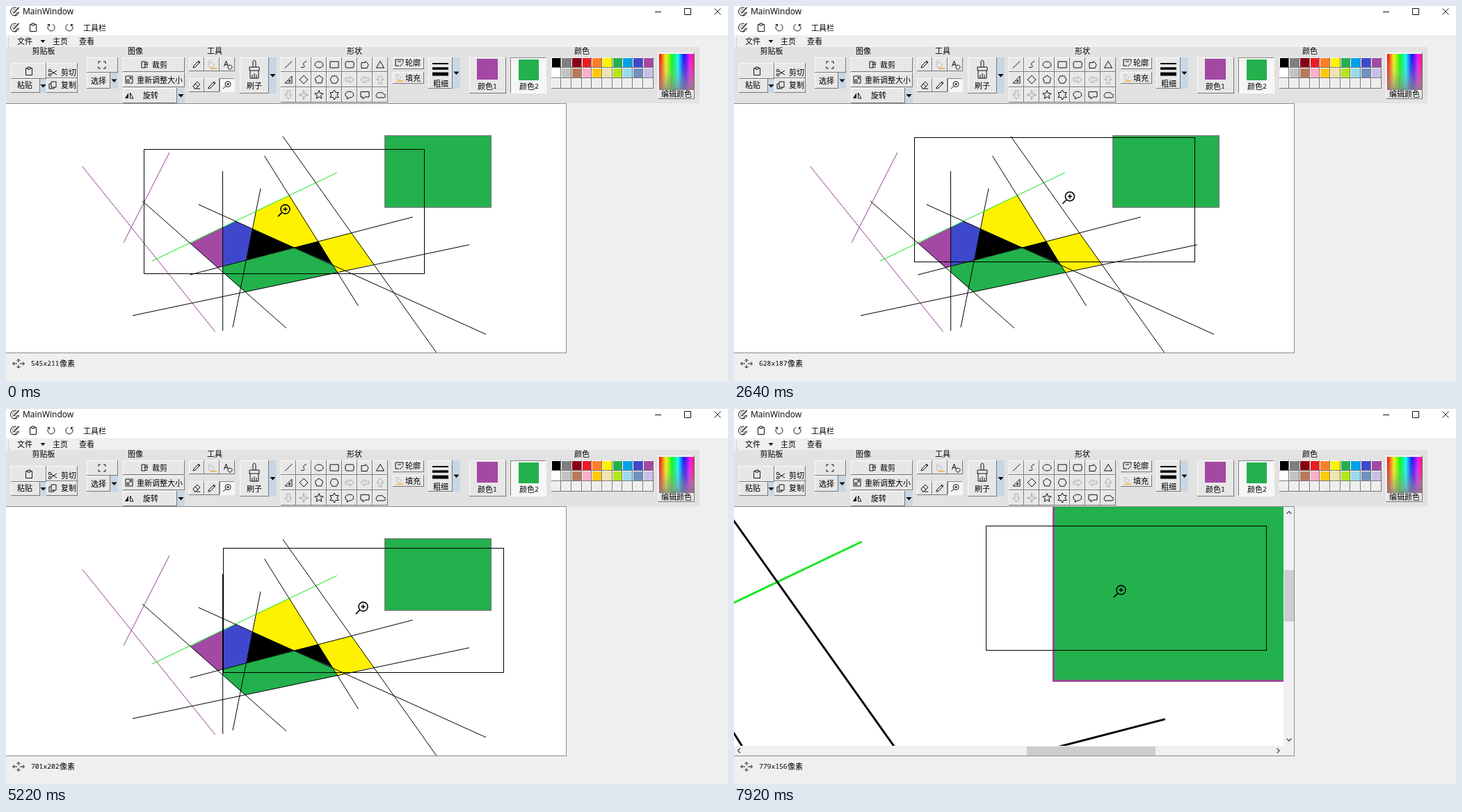
These frames come from a looping animation (1038 by 540 pixels, 7990 ms). An HTML page with a canvas:

```html
<!DOCTYPE html>
<html lang="zh-CN">
<head>
<meta charset="utf-8">
<title>MainWindow</title>
<style>
html, body { margin: 0; width: 100%; height: 100%; overflow: hidden; background: #efefef; }
canvas { display: block; }
</style>
</head>
<body>
<canvas id="stage" width="1038" height="540"></canvas>
<script>
const W = 1038, H = 540, LOOP = 7990, STEP = 69.4;
const TOP = 141, VIEW_W = 806, VIEW_H = 359, UNIT = 1.3625;
const CJK = '"Noto Sans CJK SC", "Noto Sans CJK", sans-serif';
const DIGITS = '9.7px "Noto Sans Mono", monospace';
const PURPLE = '#a349a4', GREEN = '#22b14c', YELLOW = '#fff200', BLUE = '#3f48cc';
const ctx = document.getElementById('stage').getContext('2d');

// ---------- helpers ----------
function box(g, x0, y0, x1, y1, fill) {
  g.fillStyle = fill;
  g.fillRect(x0, y0, x1 - x0, y1 - y0);
}

function line(g, x0, y0, x1, y1, color, width = 1) {
  g.strokeStyle = color;
  g.lineWidth = width;
  g.beginPath();
  g.moveTo(x0, y0);
  g.lineTo(x1, y1);
  g.stroke();
}

function label(g, s, x, y, font = '11px ' + CJK, align = 'left') {
  g.font = font;
  g.textAlign = align;
  g.textBaseline = 'middle';
  g.fillStyle = '#000';
  g.fillText(s, x, y);
}

function icon(g, d, x, y, { color = '#111', width = 1, fill = false, scale = 1 } = {}) {
  g.save();
  g.translate(x, y);
  g.scale(scale, scale);
  g.lineWidth = width;
  g.strokeStyle = g.fillStyle = color;
  const path = new Path2D(d);
  if (fill) g.fill(path); else g.stroke(path);
  g.restore();
}

function ring(n, r0, r1 = r0, turn = -90) {
  const pts = [];
  for (let i = 0; i < n; i++) {
    const a = (turn + 360 * i / n) * Math.PI / 180, r = i % 2 ? r1 : r0;
    pts.push((r * Math.cos(a)).toFixed(2) + ' ' + (r * Math.sin(a)).toFixed(2));
  }
  return 'M' + pts.join('L') + 'Z';
}

function button(g, x0, y0, x1, y1, down = false) {
  box(g, x0, y0, x1, y1, down ? '#f6f6f6' : '#e7e7e7');
  const lit = down ? '#858585' : '#fafafa', dark = down ? '#fafafa' : '#777';
  box(g, x0, y0, x1, y0 + 1, lit);
  box(g, x0, y0, x0 + 1, y1, lit);
  box(g, x0, y1 - 1, x1, y1, dark);
  box(g, x1 - 1, y0, x1, y1, dark);
}

function drop(g, x0, y0, x1, y1) {
  box(g, x0, y0, x1, y1, '#c9d7e4');
  icon(g, 'M-4 -2H4L0 2.5Z', (x0 + x1) / 2, (y0 + y1) / 2, { fill: true, color: '#000' });
}

// ---------- window and ribbon ----------
const ICON = {
  palette: 'M2 -5.5A6 6 0 1 0 5.5 1Q5 2 3 2Q1 2 1.5 4Q1.5 6 -1 6M6 -6L0 1L-1.5 2L-1 0L5 -6M-4 -1h1.5M-2 -3.5h1.5M-3.5 2h1.5',
  clip: 'M-2 -4.5H-4.5V5.5H4.5V-4.5H2M-2 -6H2V-3H-2Z',
  undo: 'M-3 -4A5 5 0 1 0 2 -4.6M-5.5 -4.5H-2.5V-1.5',
  redo: 'M3 -4A5 5 0 1 1 -2 -4.6M5.5 -4.5H2.5V-1.5',
  cut: 'M-2 2L6 -3M-2 -2L6 3M-2 -3A2 1.7 0 1 0 -6 -3A2 1.7 0 1 0 -2 -3M-2 3A2 1.7 0 1 0 -6 3A2 1.7 0 1 0 -2 3',
  copy: 'M-2 -5H5V3H-2ZM-2 -2H-5V5H2V3',
  frame: 'M-5 -2V-5H-2M2 -5H5V-2M5 2V5H2M-2 5H-5V2',
  crop: 'M-4 -4H1V5H-4ZM1 -3H5M1 4H5M-1 0H5M3 -2L5 0L3 2',
  resize: 'M-5 -5H5V5H-5ZM-3 3H0V0H-3ZM1 -1L3 -3M0 -3H3V0',
  flip: 'M-1 -4V4H-6Z',
  flipSide: 'M1.5 -4V4H6Z',
  pencil: 'M-5 5L-4 2L3 -5L5 -3L-2 4ZM2 -4L4 -2',
  bucket: 'M-4 -5L4 1L1 5L-4 4Z',
  eraser: 'M-5 1L1 -5L5 -1L-1 5H-3ZM-2 -2L2 2M-1 5H5',
  brush: 'M-2 -4V-12Q0 -16 2 -12V-4M-7 -4H7V1H-7ZM-6 1V12H6V1M-3 12V7M0 12V5M3 12V7',
  lens: 'M5 -1.5A4 4 0 1 0 -3 -1.5A4 4 0 1 0 5 -1.5M-2 1.5L-6 5M-1 -1.5H3M1 -3.5V.5',
  move: 'M-8 0H-2M2 0H8M0 -6V-2M0 2V6M-6 -2.5L-8.5 0L-6 2.5M6 -2.5L8.5 0L6 2.5M-2.5 -4L0 -6.5L2.5 -4M-2.5 4L0 6.5L2.5 4'
};

const SHAPES = [
  'M-5 5L5 -5', 'M-4 4C8 4 -7 -1 4 -5', 'M6 0A6 4.5 0 1 0 -6 0A6 4.5 0 1 0 6 0', 'M-6 -4.5H6V4.5H-6Z',
  'M-4 -4.5H4Q6 -4.5 6 -2.5V2.5Q6 4.5 4 4.5H-4Q-6 4.5 -6 2.5V-2.5Q-6 -4.5 -4 -4.5Z',
  'M-5 -3L0 -3L1 -5L5 0L3 5H-5Z', 'M0 -5L5.5 4.5H-5.5Z',
  'M-5 5L5 -5V5ZM0 2.5H2.5V0Z', ring(4, 6), ring(5, 6), ring(6, 6, 6, 0), 'M-6 -2H0V-5L6 0L0 5V2H-6Z',
  'M6 -2H0V-5L-6 0L0 5V2H6Z', 'M-2 6V0H-5L0 -6L5 0H2V6Z',
  'M-2 -6V0H-5L0 6L5 0H2V-6Z', ring(8, 7, 2), ring(10, 6.5, 2.8), ring(12, 7, 4),
  'M-3 3.5A6 4.5 0 1 1 0 4L-4 6Z', 'M-6 -4.5H6V3H0L-3 6V3H-6Z',
  'M-4 4A3 3 0 0 1 -5 -1A3.5 3.5 0 0 1 0 -3A3.5 3.5 0 0 1 5 -1A2.5 2.5 0 0 1 5 4Z'
];
const GREY_SHAPES = [11, 12, 13, 14, 15];

const SWATCHES = ['000 7f7f7f 880015 ed1c24 ff7f27 fff200 22b14c 00a2e8 3f48cc a349a4',
  'fff c3c3c3 b97a57 ffaec9 ffc90e efe4b0 b5e61d 99d9ea 7092be c8bfe7',
  'eee eee eee eee eee eee eee eee eee eee'].map(r => r.split(' '));

function drawRainbow(g, x, y, w, h) {
  let seed = 7;
  const rnd = () => (seed = seed * 16807 % 2147483647) / 2147483647;
  for (let i = 0; i < w; i += 2) {
    const hue = 345 * i / w;
    const fade = g.createLinearGradient(0, y, 0, y + h);
    fade.addColorStop(0, `hsl(${hue},95%,52%)`);
    fade.addColorStop(0.3 + 0.25 * rnd(), `hsl(${hue},80%,56%)`);
    fade.addColorStop(0.7 + 0.25 * rnd(), `hsl(${hue},38%,56%)`);
    fade.addColorStop(1, `hsl(${hue},14%,52%)`);
    g.fillStyle = fade;
    g.fillRect(x + i, y, 2, h);
  }
}

function drawWindow(g) {
  box(g, 0, 0, W, H, '#efefef');
  box(g, 0, 0, W, 42, '#fff');
  icon(g, ICON.palette, 13, 8);
  label(g, 'MainWindow', 24, 9, '12px "Open Sans", sans-serif');
  line(g, 933, 8.5, 942, 8.5, '#111');
  icon(g, 'M-4.5 -4.5H4.5V4.5H-4.5Z', 980, 8);
  icon(g, 'M-4.5 -4.5L4.5 4.5M4.5 -4.5L-4.5 4.5', 1023, 8);

  ['palette', 'clip', 'undo', 'redo'].forEach((n, i) => icon(g, ICON[n], 13 + 26 * i, 31));
  label(g, '工具栏', 111, 32);
  for (let y = 45; y < 58; y += 3) box(g, 3, y, 4, y + 1, '#999');
  label(g, '文件', 16, 51);
  icon(g, 'M-3.5 -2H3.5L0 2Z', 53, 51, { fill: true });
  label(g, '主页', 67, 51);
  label(g, '查看', 105, 51);

  box(g, 0, 59, 997, 140, '#e2e2e2');
  [['剪贴板', 54], ['图像', 186], ['工具', 300], ['形状', 501], ['颜色', 828]]
    .forEach(([s, x]) => label(g, s, x, 65, undefined, 'center'));

  // clipboard
  button(g, 7, 82, 58, 105);
  button(g, 7, 105, 49, 125);
  drop(g, 49, 105, 58, 125);
  icon(g, ICON.clip, 33, 94);
  label(g, '粘贴', 16, 114);
  button(g, 58, 82, 103, 104);
  button(g, 58, 104, 103, 125);
  icon(g, ICON.cut, 67, 96);
  icon(g, ICON.copy, 67, 114);
  label(g, '剪切', 79, 96);
  label(g, '复制', 79, 114);

  // image
  button(g, 116, 74, 161, 96);
  button(g, 116, 96, 150, 119);
  drop(g, 150, 96, 161, 119);
  icon(g, ICON.frame, 138, 85);
  label(g, '选择', 122, 108);
  button(g, 168, 74, 257, 95);
  button(g, 168, 96, 257, 117);
  button(g, 168, 118, 246, 140);
  drop(g, 246, 118, 257, 140);
  icon(g, ICON.crop, 199, 84);
  icon(g, ICON.resize, 177, 106);
  icon(g, ICON.flip, 177, 129, { fill: true });
  icon(g, ICON.flipSide, 177, 129);
  label(g, '裁剪', 210, 85);
  label(g, '重新调整大小', 188, 107);
  label(g, '旋转', 197, 129);

  // tools
  for (let i = 0; i < 6; i++) {
    const x = 263 + 22 * (i % 3), y = i < 3 ? 74 : 104;
    button(g, x, y, x + 22, y + 20, i === 5);
  }
  icon(g, ICON.pencil, 274, 84);
  icon(g, ICON.bucket, 296, 84, { color: '#bbb' });
  line(g, 294, 90, 303, 90, '#f2bd58', 2);
  label(g, 'A', 313, 84, '11px "Open Sans", sans-serif');
  icon(g, ring(12, 3), 322, 88);
  icon(g, ICON.eraser, 274, 114);
  icon(g, ICON.pencil, 296, 114);
  icon(g, ICON.lens, 318, 114);
  button(g, 336, 74, 378, 126);
  drop(g, 378, 74, 389, 126);
  icon(g, ICON.brush, 357, 92);
  label(g, '刷子', 346, 115);

  // shapes
  SHAPES.forEach((d, i) => {
    const x = 395 + 22 * (i % 7), row = Math.floor(i / 7);
    const y = Math.round(73.5 + 21.8 * row), end = Math.round(73.5 + 21.8 * (row + 1));
    button(g, x, y, x + 22, end);
    icon(g, d, x + 11, (y + end) / 2, { color: GREY_SHAPES.includes(i) ? '#aaa' : '#111' });
  });
  button(g, 556, 74, 601, 91);
  button(g, 556, 95, 601, 112);
  icon(g, 'M-5 -5H6V-1M-5 -5V4H0M-2 -2H3M1 5L6 0', 565, 82);
  icon(g, ICON.bucket, 565, 102, { color: '#bbb', scale: .8 });
  line(g, 562, 108, 571, 108, '#f2bd58', 2);
  label(g, '轮廓', 574, 82);
  label(g, '填充', 574, 104);
  button(g, 607, 74, 642, 119);
  drop(g, 642, 74, 653, 119);
  [[83, 2], [90, 3.5], [98, 5]].forEach(([y, w]) => line(g, 613, y, 636, y, '#000', w));
  label(g, '粗细', 614, 112);

  // colours
  button(g, 666, 74, 719, 126);
  button(g, 725, 74, 777, 126, true);
  box(g, 677, 76, 707, 106, PURPLE);
  box(g, 737, 77, 766, 107, GREEN);
  [['1', 678], ['2', 738]].forEach(([n, x]) => {
    label(g, '颜色', x, 116);
    label(g, n, x + 22, 116, DIGITS);
  });
  SWATCHES.forEach((row, r) => row.forEach((c, i) => {
    const x0 = Math.round(783.5 + 14.7 * i), x1 = Math.round(798.2 + 14.7 * i), y = 74 + 15 * r;
    button(g, x0, y, x1, y + 15);
    box(g, x0 + 1, y + 1, x1 - 1, y + 14, '#' + c);
  }));
  button(g, 937, 67, 990, 134);
  drawRainbow(g, 939, 69, 50, 52);
  label(g, '编辑颜色', 942, 127);

  icon(g, ICON.move, 18, 515);
}

// ---------- picture ----------
const FILLS = [
  [PURPLE, 265, 341, 311, 318, 311, 374, 304, 376],
  [BLUE, 311, 318, 330, 309, 354, 320, 346, 365, 311, 374],
  [YELLOW, 360, 294, 408, 272, 449, 338, 414, 347, 354, 320],
  [YELLOW, 449, 338, 497, 326, 529, 371, 477, 383, 469, 371],
  [GREEN, 311, 374, 414, 347, 469, 371, 477, 383, 343, 411, 311, 382],
  ['#000', 354, 320, 414, 347, 346, 365],
  ['#000', 414, 347, 449, 338, 469, 371]
];
const LINES = [
  [109.6, 230, 300.6, 468, '#914293'], [235, 210, 169, 340, '#914293'],
  [210, 366.4, 475.7, 239.2, '#10e81c'],
  [196, 280, 403, 463], [311.5, 237, 311.7, 467], [276.7, 285, 690, 472],
  [264.4, 386.3, 584.7, 303.1], [182, 445, 666, 343], [371.5, 215, 506.5, 431], [398, 187, 620, 500]
];

function drawPicture(g, zoom) {
  const pen = Math.max(1, .734 * zoom) / zoom;
  g.save();
  g.translate(0, .8);
  if (zoom === 1) {
    for (const [color, ...p] of FILLS) {
      g.fillStyle = color;
      g.beginPath();
      for (let i = 0; i < p.length; i += 2) g.lineTo(p[i], p[i + 1]);
      g.fill();
    }
    line(g, 366, 262, 326, 462, '#000', pen);
  }
  g.restore();

  box(g, 544.6, 186.7, 697.5, 290.1, GREEN);
  g.strokeStyle = zoom === 1 ? '#7d677d' : '#944a96';
  g.lineWidth = pen;
  g.strokeRect(544.6, 186.7, 152.9, 103.4);

  g.save();
  g.translate(0, .8);
  for (const [x0, y0, x1, y1, color = '#000'] of LINES) line(g, x0, y0, x1, y1, color, pen);
  g.restore();
}

// ---------- pointer path: step, x, y ----------
const KEYS = [
  [0, 400, 296], [1, 401, 293], [6, 290, 270], [12, 180, 290], [13, 180, 290],
  [19, 120, 250], [25, 190, 170], [28, 256, 181.4], [29, 274, 191], [37, 440, 280],
  [43, 560, 250], [49, 635.6, 213.7], [50, 645, 206], [56, 700, 240], [61, 720, 190],
  [65, 704, 190], [66, 684, 203.4], [67, 654, 231], [73, 530, 310], [75, 514.4, 289.5],
  [76, 513, 285], [79, 423, 315.5], [88, 423, 315.5], [95, 617, 228], [111, 617, 228],
  [113.5, 568, 253], [114, 564, 258], [115, 556, 261]
];

const slope = (i, c) => (KEYS[i + 1][c] - KEYS[i][c]) / (KEYS[i + 1][0] - KEYS[i][0]);

function tangent(i, c) {
  if (i === 0 || i === KEYS.length - 1) return 0;
  const a = slope(i - 1, c), b = slope(i, c);
  return a * b > 0 ? 2 * a * b / (a + b) : 0;
}

// monotone cubic, so that rests stay flat
function pointer(k) {
  k = Math.max(0, Math.min(115, k));
  let i = 0;
  while (i < KEYS.length - 2 && k >= KEYS[i + 1][0]) i++;
  const h = KEYS[i + 1][0] - KEYS[i][0], u = (k - KEYS[i][0]) / h, v = 1 - u;
  return [1, 2].map(c =>
    KEYS[i][c] * (1 + 2 * u) * v * v + KEYS[i + 1][c] * u * u * (3 - 2 * u) +
    h * u * v * (v * tangent(i, c) - u * tangent(i + 1, c)));
}

function drawBars(g, zoom, sx, sy) {
  box(g, 790, TOP, 806, 500, '#f0f0f0');
  box(g, 0, 485, 806, 500, '#f0f0f0');
  const x = 16.5 + sx / (VIEW_W * zoom) * 758, y = 157.5 + sy / (VIEW_H * zoom) * 310;
  box(g, 791, Math.round(y), 805, Math.round(y + 344 / (VIEW_H * zoom) * 310), '#cdcdcd');
  box(g, Math.round(x), 486, Math.round(x + 790 / (VIEW_W * zoom) * 758), 499, '#cdcdcd');
  const pen = { color: '#505050', width: 1.4 };
  icon(g, 'M-3.5 2L0 -1.5L3.5 2', 798, 149, pen);
  icon(g, 'M-3.5 -2L0 1.5L3.5 -2', 798, 476.5, pen);
  icon(g, 'M2 -3.5L-1.5 0L2 3.5', 7, 492, pen);
  icon(g, 'M-2 -3.5L1.5 0L-2 3.5', 782.5, 492, pen);
}

function drawCursor(g, x, y) {
  g.save();
  g.translate(x + .5, y - .4);
  g.strokeStyle = '#000';
  g.lineWidth = 1.6;
  g.beginPath();
  g.arc(0, 0, 6.5, 0, 7);
  g.moveTo(-4.8, 4.8);
  g.lineTo(-10.5, 10.5);
  g.moveTo(-3, 0);
  g.lineTo(3, 0);
  g.moveTo(0, -3);
  g.lineTo(0, 3);
  g.stroke();
  g.restore();
}

const base = document.createElement('canvas');
base.width = W;
base.height = H;
drawWindow(base.getContext('2d'));

function draw(t) {
  const g = ctx, k = Math.floor((t + 7) / STEP);
  const [zoom, sx, sy] = t < 5830 ? [1, 0, 0] : t < 7380 ? [2, 442, 170] : [4, 1719, 346];
  const [x, y] = pointer(k);

  g.drawImage(base, 0, 0);
  box(g, 0, TOP, VIEW_W, 500, '#fff');

  g.save();
  g.beginPath();
  g.rect(0, TOP, zoom > 1 ? 790 : VIEW_W, zoom > 1 ? 344 : VIEW_H);
  g.clip();
  g.save();
  g.translate(-sx, TOP - sy);
  g.scale(zoom, zoom);
  g.translate(0, -TOP);
  drawPicture(g, zoom);
  g.restore();
  const left = Math.max(0, Math.min(402, Math.round(x - 202)));
  const top = Math.max(TOP, Math.min(320, Math.round(y - 90)));
  g.strokeStyle = '#000';
  g.lineWidth = 1;
  g.strokeRect(left + .5, top + .5, 403, 179);
  g.restore();

  if (zoom > 1) drawBars(g, zoom, sx, sy);
  line(g, 0, 140.5, 806, 140.5, '#8c8c8c');
  line(g, 805.5, 140.5, 805.5, 500, '#8c8c8c');
  line(g, 0, 499.5, 806, 499.5, '#8c8c8c');

  // image coordinates under the pointer
  const [px, py] = zoom > 2 ? pointer(k - .5) : [x, y];
  const u = Math.round((px + sx) / zoom * UNIT), v = Math.round((py - TOP + sy) / zoom * UNIT);
  const pos = u + 'x' + v;
  label(g, pos, 36, 515, DIGITS);
  label(g, '像素', 36 + 5.85 * pos.length, 515);

  drawCursor(g, ...pointer(k + 1));
}

const start = performance.now();
function tick() {
  draw((performance.now() - start) % LOOP);
  requestAnimationFrame(tick);
}
tick();
</script>
</body>
</html>
```
